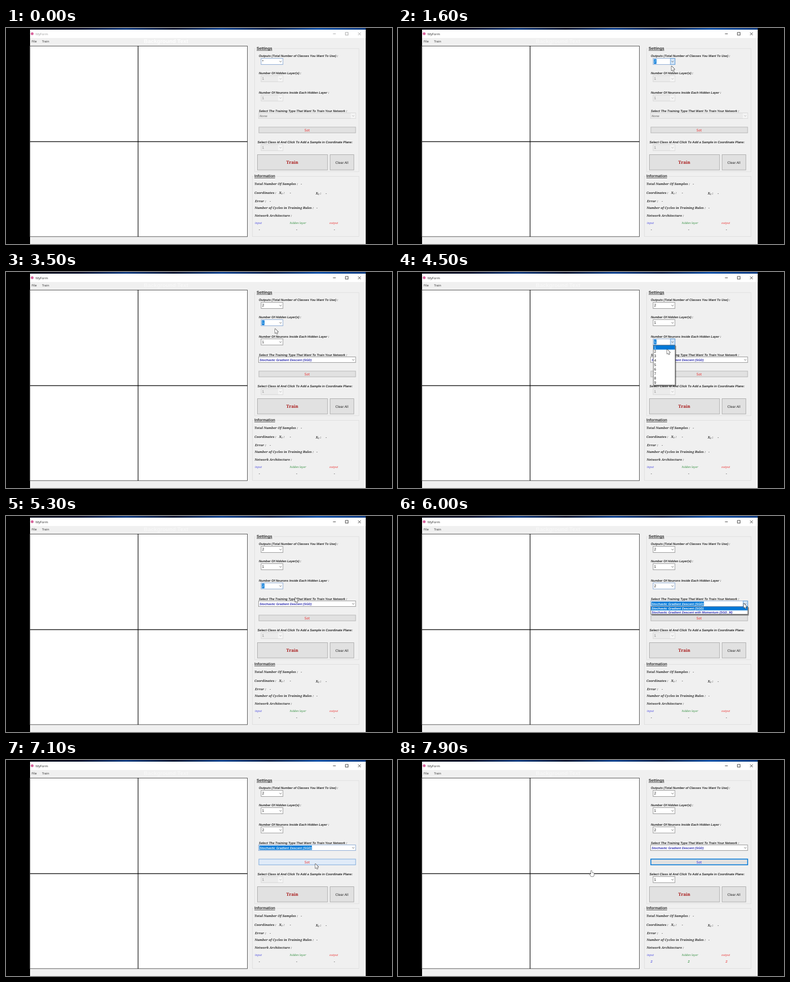
An HTML page with a canvas that plays this animation: 690 px wide and 388 px high, repeating every 8 s.

```html
<!DOCTYPE html>
<html lang="en">
<head>
<meta charset="utf-8">
<title>Network trainer form</title>
<style>
html, body { margin: 0; height: 100%; overflow: hidden; background: #000; }
canvas { display: block; }
</style>
</head>
<body>
<canvas width="690" height="388"></canvas>
<script>
const LOOP = 8000;
const ctx = document.querySelector('canvas').getContext('2d');
ctx.textRendering = 'geometricPrecision';

const SANS = '"Liberation Sans", Arial, sans-serif';
const SERIF = '"Noto Serif", serif';
const UI = '"Open Sans", sans-serif';
const LABEL = 'italic bold 5.57px ' + SANS;
const INFO = 'italic bold 5.7px ' + SERIF;
const DIGIT = '6.7px ' + SANS;
const BLUE = '#0078d7', FACE = '#f0f0f0', INK = '#262626', NAVY = '#2c2cae';

const SET_CLICK = 7250, ENABLE = 1800;
const digits = (from, to) => Array.from({ length: to - from + 1 }, (_, i) => String(from + i));
const SGD = 'Stochastic Gradient Descent (SGD)';

// Times: enable, open/close of the list, sel = selected text, hot = lit arrow, ring = blue border
const combos = [
  { x: 456, y: 54.6, w: 39, h: 11, row: 7.9, items: digits(2, 9), before: '*', after: '2',
    enable: 0, open: 1050, close: 1500, sel: [1050, 2350], hot: [900, 2300], ring: [0, 3300] },
  { x: 456, y: 85.6, w: 39, h: 11, row: 7.9, items: digits(1, 9), before: '1', after: '1',
    enable: ENABLE, open: 2760, close: 3400, sel: [2700, 4100], hot: [2650, 3500], ring: [2700, 4100] },
  { x: 456, y: 120.1, w: 39, h: 11, row: 7.9, items: digits(1, 9), before: '1', after: '2',
    enable: ENABLE, open: 4200, close: 5050, sel: [4150, 5700], hot: [3900, 5150], ring: [4150, 6900] },
  { x: 451.5, y: 152.6, w: 173.5, h: 10, row: 6.5, items: [SGD, 'Stochastic Gradient Descent with Momentum (SGD_M)'],
    before: 'None', after: SGD, wide: true,
    enable: ENABLE, open: 5780, close: 6550, sel: [5750, SET_CLICK], hot: [5700, 6550], ring: [5750, SET_CLICK] },
  { x: 456, y: 209.3, w: 39, h: 11, items: [], before: '1', after: '1', enable: SET_CLICK }
];

// Pointer path: time, x, y
const path = [
  [100, 600, 250], [900, 490, 60], [1100, 490, 60], [1300, 488, 70], [1600, 489, 68.5],
  [2300, 489, 69], [2700, 490, 93], [2900, 490, 93], [3200, 480, 99], [3400, 480, 99],
  [3900, 490, 127], [4250, 490, 127], [4500, 481, 139], [4800, 481, 143], [5100, 481, 143],
  [5700, 618, 157], [6100, 618, 157], [6450, 600, 166], [6600, 600, 166], [7000, 553, 186.5],
  [SET_CLICK, 553, 186.5], [7700, 354, 200], [7900, 346, 199]
];

const during = (t, span) => !!span && t >= span[0] && t < span[1];

function pointerAt(t) {
  const i = path.findIndex(p => p[0] > t);
  if (i < 0) return path[path.length - 1].slice(1);
  if (i === 0) return path[0].slice(1);
  const [t0, x0, y0] = path[i - 1], [t1, x1, y1] = path[i];
  const u = (t - t0) / (t1 - t0), e = u * u * (3 - 2 * u);
  return [x0 + (x1 - x0) * e, y0 + (y1 - y0) * e];
}

function text(s, x, y, font = LABEL, color = INK, align = 'left') {
  ctx.font = font;
  ctx.fillStyle = color;
  ctx.textAlign = align;
  ctx.fillText(s, x, y);
}

function fill(x, y, w, h, color) {
  ctx.fillStyle = color;
  ctx.fillRect(x, y, w, h);
}

function box(x, y, w, h, face, edge, line = 1) {
  if (face) fill(x, y, w, h, face);
  ctx.strokeStyle = edge;
  ctx.lineWidth = line;
  ctx.strokeRect(x, y, w, h);
}

function lines(points, color, width, close) {
  ctx.beginPath();
  points.forEach(([x, y]) => ctx.lineTo(x, y));
  if (close) ctx.closePath();
  ctx.strokeStyle = color;
  ctx.lineWidth = width;
  ctx.stroke();
}

function drawWindow(t) {
  fill(0, 0, 690, 388, '#000');
  const sky = ctx.createLinearGradient(43, 0, 643, 0);
  ['#030816', '#04102a', '#0a3a80', '#051530', '#0a4290', '#06204a', '#0c50a8', '#083a80']
    .forEach((c, i, all) => sky.addColorStop(i / (all.length - 1), c));
  fill(43, 0, 600, 3, sky);
  fill(43, 3, 600, 385, FACE);
  fill(43, 3, 600, 15, '#fff');

  const tint = t < 1000 ? '#999' : INK;
  ctx.fillStyle = '#d8649c';
  ctx.beginPath();
  ctx.arc(46.8, 10.3, 2.5, 0, 7);
  ctx.fill();
  text('MyForm', 53, 12.6, '5.7px ' + UI, tint);
  lines([[584.5, 10.5], [589.5, 10.5]], tint, 0.8);
  box(606.8, 8, 4.8, 4.8, null, tint, 0.8);
  lines([[629.3, 8], [634.3, 13]], tint, 0.8);
  lines([[634.3, 8], [629.3, 13]], tint, 0.8);
  text('File', 46, 26, '5.6px ' + UI);
  text('Train', 64.5, 26, '5.4px ' + UI);

  ctx.globalAlpha = Math.max(0.45, 0.8 - t / 2500);
  text('Background Text', 286, 26.5, 'bold 9.8px ' + SANS, '#fff', 'center');
  ctx.globalAlpha = 1;

  box(42.8, 32.4, 388.7, 342.4, '#fff', '#444', 0.85);
  lines([[236.1, 32], [236.1, 375]], '#000', 1.1);
  lines([[43, 204.1], [431.5, 204.1]], '#000', 1.1);
}

function heading(s, x, y, w, size) {
  fill(x - 2, y - 6, w + 4, 9, FACE);
  text(s, x, y, `bold ${size}px ${SANS}`, INK);
  fill(x, y + 0.9, w, 0.7, INK);
}

function drawSettings(t) {
  box(444.5, 37, 186.5, 221, null, '#dcdcdc', 0.8);
  heading('Settings', 448, 39, 28, 7.1);
  text('Outputs (Total Number of Classes You Want To Use) :', 452, 52);
  text('Number Of Hidden Layer(s) :', 452, 83.4);
  text('Number Of Neurons Inside Each Hidden Layer :', 452, 117.5);
  text('Select The Training Type That Want To Train Your Network :', 452, 150.5);
  text('Select Class id And Click To Add a Sample in Coordinate Plane:', 449.5, 207, 'italic bold 5.64px ' + SANS);

  const done = t >= SET_CLICK, hover = t >= 6800 && !done;
  box(452, 178, 173, 10.3, hover ? '#e0ebf8' : '#e1e1e1',
    done ? BLUE : hover ? '#78a6da' : '#b4b4b4', done ? 1.5 : 0.9);
  text('Set', 538.3, 185.6, '6.7px ' + SERIF, done ? '#3434e0' : '#ec3c3c', 'center');
  box(449.5, 227.5, 125.3, 27.5, '#e1e1e1', '#b0b0b0');
  text('Train', 511.7, 244.2, 'bold 7.7px ' + SERIF, '#a81818', 'center');
  box(579.3, 227.5, 42.5, 27.5, '#e1e1e1', '#b0b0b0');
  text('Clear All', 600.3, 244, '6.2px ' + SANS, INK, 'center');
}

function drawInfo(t) {
  box(440.5, 266.5, 190.5, 108, null, '#dcdcdc', 0.8);
  heading('Information', 444, 268.1, 37, 6.75);
  [['Total Number Of Samples :', 444, 282.4, 527], ['Coordinates :', 444, 297.8], ['X₁ :', 488, 297.8, 507.5],
   ['X₂ :', 553.5, 298.6, 571.5], ['Error :', 445, 313, 471.5],
   ['Number of Cycles in Training Rules :', 444.5, 325.2, 555], ['Network Architecture :', 444.5, 338.8]]
    .forEach(([s, x, y, dash]) => {
      text(s, x, y, INFO);
      if (dash) text('-', dash, y, INFO);
    });
  [['input', 445, 453, '#5050e0'], ['hidden layer', 507.3, 519.7, '#3c9448'], ['output', 578, 587.2, '#ec4040']]
    .forEach(([s, x, cx, color]) => {
      text(s, x, 352, 'italic 5.1px ' + SERIF, color);
      const done = t >= SET_CLICK;
      text(done ? '2' : '-', cx, 363.6, INFO, done ? color : INK, 'center');
    });
}

function drawCombo(c, t) {
  const { x, y, w, h } = c;
  const on = t >= c.enable, hot = during(t, c.hot), sel = during(t, c.sel);
  const s = t >= (c.wide ? c.enable : c.close || 0) ? c.after : c.before;
  const font = c.wide ? LABEL : DIGIT, base = y + h / 2 + (c.wide ? 2 : 2.3);
  box(x, y, w, h, on ? '#fff' : '#ebebeb', during(t, c.ring) ? '#86a6d2' : on ? '#929292' : '#d6d6d6', 0.9);
  if (!on) fill(x + w - 8.5, y + 0.5, 8, h - 1, '#f5f5f5');
  if (hot) box(x + w - 8, y, 8, h, '#d5e6f7', '#5c9bd8', 0.9);
  if (sel) {
    ctx.font = font;
    fill(x + 1.3, y + 1.2, ctx.measureText(s).width + 1, h - 2.4, BLUE);
  }
  text(s, x + 1.8, base, font, sel ? '#fff' : !on ? '#8c8c8c' : c.wide ? NAVY : INK);
  const ax = x + w - 4.3, ay = y + h / 2;
  lines([[ax - 1.9, ay - 0.8], [ax, ay + 1.1], [ax + 1.9, ay - 0.8]], on ? '#505050' : '#aaa', 0.8);
}

// The list slides down, bottom rows first
function drawList(c, t, py) {
  if (!during(t, [c.open, c.close])) return;
  const { x, w, row, items } = c;
  const top = c.y + c.h + 0.4, full = items.length * row + 0.5;
  const shown = full * Math.min(1, (t - c.open) / 200);
  const picked = Math.max(0, Math.min(items.length - 1, Math.floor((py - top) / row)));
  fill(x + 2, top + 1, w + 0.2, shown + 1.2, '#0006');
  box(x + 0.3, top, w, shown, '#fff', '#555', 0.8);
  ctx.save();
  ctx.beginPath();
  ctx.rect(x, top, w + 1, shown);
  ctx.clip();
  items.forEach((s, i) => {
    const y = top + shown - full + i * row;
    if (i === picked) fill(x + 0.7, y, w - 0.8, row, BLUE);
    text(s, x + 1.8, y + row / 2 + 2.1, c.wide ? LABEL : DIGIT, i === picked ? '#fff' : c.wide ? NAVY : INK);
  });
  ctx.restore();
}

function drawPointer(t, x, y) {
  if (t < 100) return;
  const hand = x < 431 && y > 32;
  const shape = hand
    ? [[-1, 0], [0.5, 0], [0.8, 3.5], [4, 4.2], [4.6, 5.2], [4.3, 8], [3.3, 10], [-0.8, 10], [-3.5, 6.2], [-3, 5.2], [-1, 6.5]]
    : [[0, 0], [0, 8], [1.8, 6.4], [3.1, 9.3], [4.4, 8.7], [3.1, 5.9], [5.6, 5.7]];
  ctx.save();
  ctx.translate(x, y);
  ctx.lineJoin = 'round';
  lines(shape, '#333', 1.1, true);
  ctx.fillStyle = '#fff';
  ctx.fill();
  ctx.restore();
}

function frame(now) {
  const t = now % LOOP, [px, py] = pointerAt(t);
  drawWindow(t);
  drawSettings(t);
  drawInfo(t);
  combos.forEach(c => drawCombo(c, t));
  combos.forEach(c => drawList(c, t, py));
  drawPointer(t, px, py);
  requestAnimationFrame(frame);
}
requestAnimationFrame(frame);
</script>
</body>
</html>
```
